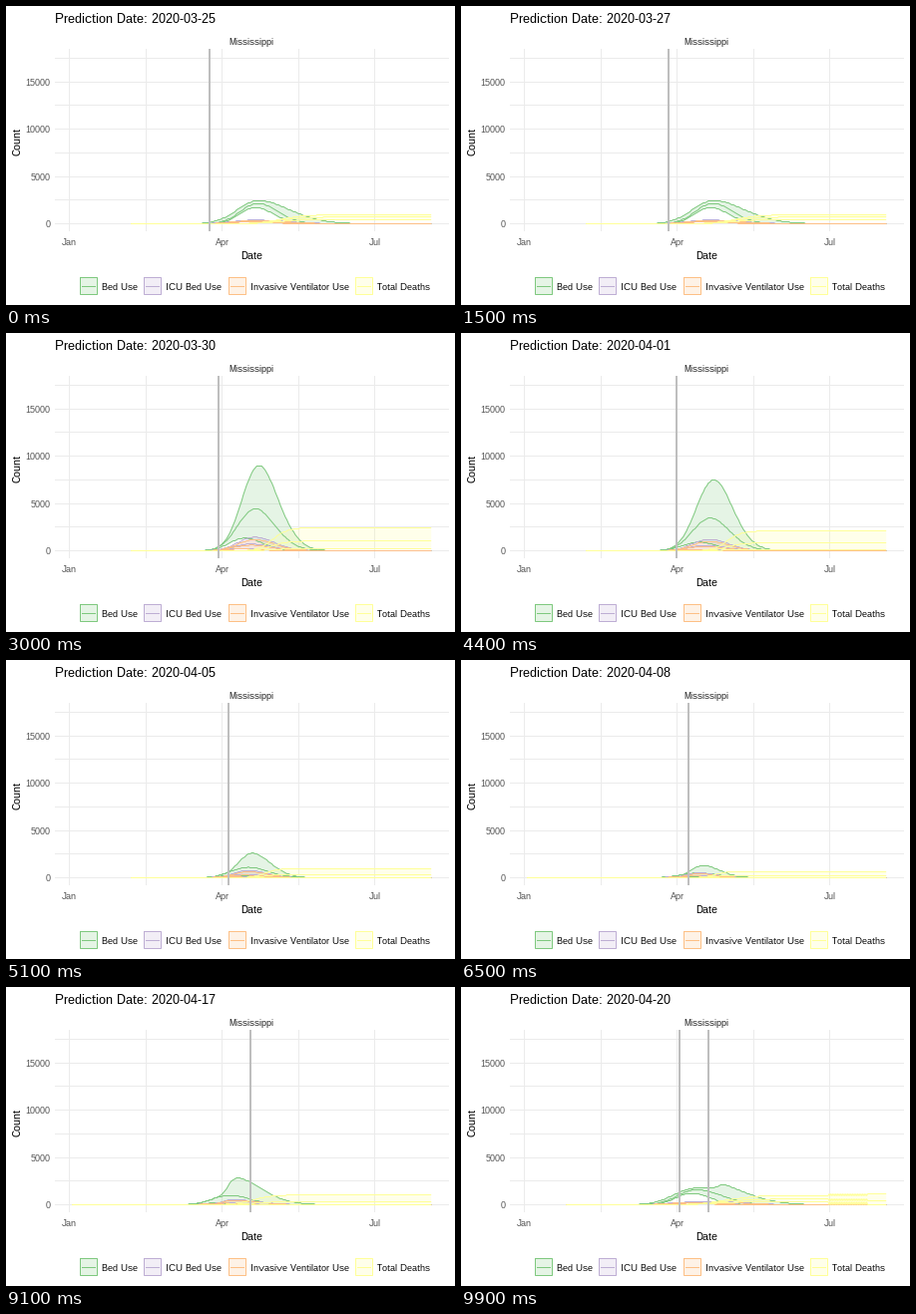
Write a matplotlib script that moves like this. It is 450 by 300 pixels and loops after 10000 ms.

```python
import math

import matplotlib.pyplot as plt
import numpy as np
from matplotlib.animation import FuncAnimation

W, H, DPI = 450, 300, 72
LEFT, RIGHT, TOP, BOTTOM = 49, 444, 43, 226

plt.rcParams["font.family"] = "Liberation Sans"
plt.rcParams["path.simplify"] = False
plt.rcParams["text.hinting"] = "native"
plt.rcParams["text.hinting_factor"] = 1

KEYS = [(74.5, "Bed Use", "#7fc97f"),
        (138.5, "ICU Bed Use", "#beaed4"),
        (223.5, "Invasive Ventilator Use", "#fdc086"),
        (350.5, "Total Deaths", "#ffff99")]
COLORS = [k[2] for k in KEYS]

# Days after 25 March: each release, and the model revision it shows
RELEASES = [0, 1, 2, 4, 5, 6, 7, 11, 13, 14, 16, 19, 23, 26]
REVISIONS = [0, 0, 0, 4, 5, 6, 7, 11, 11, 14, 16, 19, 23, 26]
FIRST_DAY = 84


def through(*points):
    """Piecewise linear function through (day, value) points."""
    days, values = zip(*points)
    return lambda d: np.interp(d, days, values)


peak_at = through((0, 2450), (4, 17450), (5, 9000), (7, 7500),
                  (11, 2600), (14, 1280), (19, 1800), (26, 3300))
mean_at = through((0, .88), (4, .51), (7, .46), (14, .4), (19, .22), (26, .4))
mid_at = through((7, 254), (14, 243), (19, 241), (26, 226))
rise_at = through((0, 22), (4, 17), (7, 18), (19, 9))
fall_at = through((0, 30), (4, 19), (19, 15), (26, 29))
icu_at = through((7, .16), (14, .4), (26, .16))


def day_x(day):
    return 63 + 153 / 91 * day


def count_y(v):
    return 218.5 - .0095 * v


def pixel(v):
    return np.floor(v) + .5


def bell(x, mid, left, right):
    z = np.abs(x - mid) / np.where(x < mid, left, right)
    return np.exp(-.5 * z ** np.where(x < mid, 2.1, 1.85))


def beds(x, d):
    """Upper, mean and lower bed counts."""
    peak, m, mid = peak_at(d), mean_at(d), mid_at(d)
    upper = peak * bell(x, mid, rise_at(d), fall_at(d))
    mean = peak * m * bell(x, mid - 7 * (1 - m), 18, 19)
    lower = peak * m ** 2.7 * bell(x, mid - 28 * (1 - m), 16, 17)
    mean = np.maximum(mean, lower)
    return np.array([np.maximum(upper, mean), mean, lower])


def deaths(x, d):
    """Upper, mean and lower total deaths."""
    m, fall = mean_at(d), fall_at(d)
    total = 380 + .225 * peak_at(d)
    z = (x - mid_at(d) - .7 * fall) / (.4 * fall)
    curve = np.clip((1 / (1 + np.exp(-z)) - .01) / .98, 0, 1)
    return np.outer([total, .85 * m * total, .7 * m ** 3 * total], curve)


def build(d):
    """Array of series x (x, upper, mean, lower) x days."""
    x = day_x(np.arange(2 if d >= 14 else 37, 217))
    icu = icu_at(d) * beds(x + 4, d)
    return np.array([np.vstack([x, v])
                     for v in (beds(x, d), icu, .82 * icu, deaths(x, d))])


STATES = [build(d) for d in REVISIONS]


def timeline():
    """One (state, step, steps) entry per frame."""
    out = []
    for i in range(len(RELEASES)):
        out += [(i, 0, 1)] * (5 if i == 1 else 4)
        n = 4 if i in (1, 2) else 3
        out += [(i, k, n) for k in range(1, n + 1)]
    return out[:100]


FRAMES = timeline()


def blend(a, b, t):
    """Pair rows by index; surplus old rows stay until the change is over."""
    if t in (0, 1):
        return b if t else a
    n = min(a.shape[2], b.shape[2])
    mix = (1 - t) * a[:, :, :n] + t * b[:, :, :n]
    mix = np.concatenate([mix, a[:, :, n:]], axis=2)
    return mix[:, :, np.argsort(mix[0, 0], kind="stable")]


def date_text(d):
    month, day = (3, 25 + d) if d < 7 else (4, d - 6)
    return f"Prediction Date: 2020-{month:02}-{day:02}"


fig = plt.figure(figsize=(W / DPI, H / DPI), dpi=DPI, facecolor="white")
ax = fig.add_axes([0, 0, 1, 1])
ax.set_xlim(0, W)
ax.set_ylim(H, 0)
ax.axis("off")


def label(x, y, s, size, color="black", **kw):
    return ax.text(x, y, s, fontsize=size, color=color, **kw)


def line(x, y, color, width=1, z=3):
    return ax.plot(x, y, color=color, lw=width, zorder=z, snap=False,
                   solid_capstyle="butt", solid_joinstyle="miter")[0]


def draw_panel():
    for x in (63, 140, 216, 293, 369):
        line([x + .5] * 2, [TOP, BOTTOM], "#ebebeb", z=1)
    for v in range(0, 17501, 2500):
        line([LEFT, RIGHT], [pixel(count_y(v))] * 2, "#ebebeb", z=1)
    for v in range(0, 15001, 5000):
        label(44.3, count_y(v) + 3.8, str(v), 9, "#4d4d4d", ha="right")
    for x, s in ((63, "Jan"), (216.5, "Apr"), (369.5, "Jul")):
        label(x, 240.3, s, 9.2, "#4d4d4d", ha="center")
    label(246, 39, "Mississippi", 9.4, "#1a1a1a", ha="center")
    label(246, 254, "Date", 10.8, ha="center")
    label(17, 136.5, "Count", 10.9, rotation=90, ha="right", va="center")


def draw_legend():
    top, size = 272.5, 17
    for x, name, color in KEYS:
        xs = [x, x + size, x + size, x, x]
        ys = [top, top, top + size, top + size, top]
        ax.fill(xs, ys, color=color, alpha=.2, lw=0)
        line(xs, ys, color)
        line([x + 1.5, x + size - 1.5], [top + 9] * 2, color)
        label(x + 21.5, 285.3, name, 9.4)


draw_panel()
draw_legend()
title = label(49.3, 17.2, "", 12.9)
fills = [ax.fill([0], [0], color=c, alpha=.2, lw=0, zorder=2)[0]
         for c in COLORS]
curves = [[line([], [], c) for _ in range(3)] for c in COLORS]
markers = [line([], [], "#bebebe", 2, z=4) for _ in range(2)]


def update(frame):
    i, step, steps = FRAMES[frame]
    j = (i + 1) % len(RELEASES)
    t = step / steps
    data = blend(STATES[i], STATES[j], t)
    for fill, lines, (x, *values) in zip(fills, curves, data):
        ys = [pixel(count_y(v)) for v in values]
        fill.set_xy(np.column_stack([np.r_[x, x[::-1]],
                                     np.r_[ys[0], ys[2][::-1]]]))
        for ln, y in zip(lines, ys):
            ln.set_data(x, y)

    x0, x1 = (day_x(FIRST_DAY + RELEASES[k]) for k in (i, j))
    stays = 0 < t < 1 and STATES[i].shape[2] > STATES[j].shape[2]
    moving = x0 + t * (x1 - x0)
    for marker, x in zip(markers, (moving, x0 if stays else moving)):
        marker.set_data([round(x)] * 2, [TOP, BOTTOM])

    shown = j if step > math.ceil(steps / 2) else i
    title.set_text(date_text(RELEASES[shown]))
    return [title, *fills, *markers, *(ln for c in curves for ln in c)]


anim = FuncAnimation(fig, update, frames=len(FRAMES), interval=100,
                     repeat=True, repeat_delay=0, blit=False)
plt.show()
```
